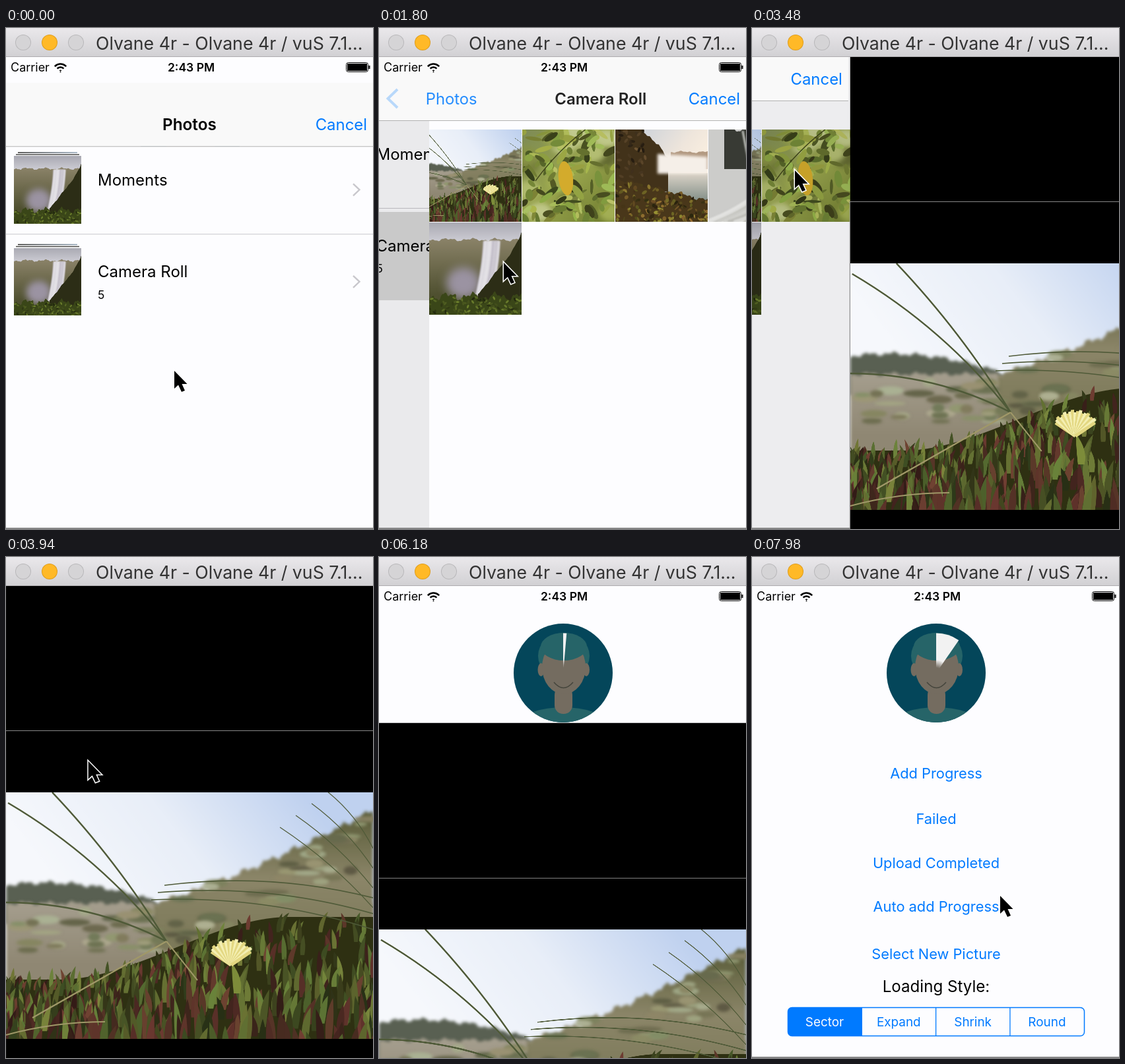
Animation, 556 px wide and 760 px high, one loop 8000 ms. Source, as an HTML page with a canvas:

```html
<!DOCTYPE html>
<html lang="en">
<head>
<meta charset="utf-8">
<title>Photo picker</title>
<style>
html, body { margin: 0; width: 100%; height: 100%; overflow: hidden; background: #fdfdff; }
canvas { display: block; width: 556px; height: 760px; }
</style>
</head>
<body>
<canvas id="stage" width="556" height="760"></canvas>
<script>
const W = 556, H = 760, TOP = 44, SCREEN = 989, LOOP = 8000;
const PAPER = '#fdfdff', BAR = '#f9f9f9', BLUE = '#007aff', INK = '#000';
const RULE = '#c8c7cc', BORDER = '#8a8a8a';
const FONT = 'Inter, Roboto, sans-serif';
const stage = document.getElementById('stage').getContext('2d');
let c = stage;

// ---------- helpers ----------
const clamp = v => Math.max(0, Math.min(1, v));
const mix = (a, b, p) => a + (b - a) * p;
const smooth = p => p * p * (3 - 2 * p);
const rough = x => Math.sin(x * 0.17) + Math.sin(x * 0.41 + 2) * 0.7 + Math.sin(x * 0.93) * 0.4;
const hsl = (h, s, l) => `hsl(${h},${s}%,${l}%)`;

// Share of a critically damped spring still to travel.
function left(t, start) {
  const x = Math.max(0, t - start) * 0.01826;
  return (1 + x) * Math.exp(-x);
}

function random(seed) {
  return () => {
    seed = (seed * 1664525 + 1013904223) >>> 0;
    return seed / 4294967296;
  };
}

function rect(x, y, w, h, fill) {
  c.fillStyle = fill;
  c.fillRect(x, y, w, h);
}

function round(x, y, w, h, r) {
  c.beginPath();
  c.roundRect(x, y, w, h, r);
}

function oval(x, y, rx, ry, fill, turn = 0) {
  c.beginPath();
  c.ellipse(x, y, rx, ry, turn, 0, 7);
  c.fillStyle = fill;
  c.fill();
}

// Fills from the curve top(x) down to a level.
function ridge(fill, x0, x1, bottom, top) {
  c.beginPath();
  c.moveTo(x0, bottom);
  for (let x = x0; x <= x1; x += 2) c.lineTo(x, top(x));
  c.lineTo(x1, bottom);
  c.fillStyle = fill;
  c.fill();
}

function line(color, width, ...p) {
  c.beginPath();
  for (let i = 0; i < p.length; i += 2) c.lineTo(p[i], p[i + 1]);
  c.strokeStyle = color;
  c.lineWidth = width;
  c.stroke();
}

// A curve whose control point lies off the middle by bend.
function stalk(color, width, x0, y0, x1, y1, bend = 0) {
  const dx = x1 - x0, dy = y1 - y0, k = bend / Math.hypot(dx, dy);
  c.beginPath();
  c.moveTo(x0, y0);
  c.quadraticCurveTo((x0 + x1) / 2 + dy * k, (y0 + y1) / 2 - dx * k, x1, y1);
  c.strokeStyle = color;
  c.lineWidth = width;
  c.stroke();
}

function ramp(x0, y0, x1, y1, ...colors) {
  const g = c.createLinearGradient(x0, y0, x1, y1);
  colors.forEach((k, i) => g.addColorStop(i / (colors.length - 1), k));
  return g;
}

// Text placed by the middle of its capitals.
function text(s, x, y, size, color, align = 'left', weight = 400) {
  c.font = `${weight} ${size}px ${FONT}`;
  c.textAlign = align;
  c.fillStyle = color;
  c.fillText(s, x, y + size * 0.36);
}

function faded(alpha, draw) {
  c.save();
  c.globalAlpha = clamp(alpha);
  draw();
  c.restore();
}

function moved(x, y, draw) {
  c.save();
  c.translate(x, y);
  draw();
  c.restore();
}

function soft(px, draw) {
  c.filter = `blur(${px}px)`;
  draw();
  c.filter = 'none';
}

// ---------- pictures ----------
function picture(w, h, draw) {
  const cv = document.createElement('canvas');
  cv.width = w * 2;
  cv.height = h * 2;
  c = cv.getContext('2d');
  c.scale(2, 2);
  draw(random(w + draw.name.length * 97));
  c = stage;
  return cv;
}

function blade(x, y, w, h, lean, fill) {
  c.beginPath();
  c.moveTo(x - w / 2, y);
  c.quadraticCurveTo(x - w * 0.8, y - h * 0.6, x + lean, y - h);
  c.quadraticCurveTo(x + w, y - h * 0.5, x + w / 2, y);
  c.fillStyle = fill;
  c.fill();
}

function dune(rnd) {
  rect(0, 0, W, 374, ramp(120, 190, 420, -40, '#f6f8fc', '#e8eef8', '#bfd1ef'));
  soft(5, () => {
    const hill = x => 168 - 140 * ((x - 224) / 332) ** 1.2 + rough(x) * 3;
    ridge('#596052', 0, 250, 200, x => 137 + 33 * ((x - 60) / 180) ** 2 + rough(x) * 2);
    ridge(ramp(0, 165, 0, 260, '#a59e8e', '#8f8773'), 0, W, 374, x => 168 + rough(x) * 2);
    ridge(ramp(0, 40, 0, 220, '#5d5f3c', '#8b8568', '#7d7a5a'), 224, W, 240, hill);
    for (let i = 0; i < 70; i++) {
      const x = rnd() * W, y = (x < 224 ? 170 : hill(x)) + rnd() * 75;
      oval(x, y, 8 + rnd() * 16, 3 + rnd() * 4, hsl(48 + rnd() * 30, 16, 30 + rnd() * 34));
    }
  });
  const edge = x => 270 - 95 * smooth(clamp((x - 80) / 350));
  ridge('#2e3012', 0, W, 374, x => edge(x) + 14);
  for (let i = 0; i < 520; i++) {
    const d = i / 520, x = rnd() * 570 - 7, red = rnd() < 0.2 + d * 0.25;
    blade(x, mix(edge(x) + 24, 410, d), mix(5, 10, d), mix(26, 64, d) * (0.6 + rnd() * 0.6),
      (rnd() - 0.4) * 20, red ? hsl(8 + rnd() * 12, 38, 14 + rnd() * 18) : hsl(65 + rnd() * 18, 38, 13 + rnd() * 25));
  }
  const green = '#4f5a38', straw = '#a09868';
  const root = [243, 226];
  [[3, 16, 30], [70, 0, 15], [0, 167, 30]].forEach(([x, y, bend]) => stalk(green, 2.4, x, y, ...root, bend));
  for (let i = 0; i < 3; i++) stalk(green, 1.6, 240 - i * 10, 141 + i * 11, W, 160 + i * 24, 30);
  for (let i = 0; i < 4; i++) stalk(green, 1.2, 415 + i * 24, 53 - i * 18, W, 175 - i * 30, 12);
  stalk(straw, 2.4, ...root, 40, 342);
  stalk(straw, 2, ...root, 290, 285);
  stalk(straw, 2, 0, 368, 150, 348, 10);
  blade(350, 305, 10, 46, -8, '#7d8c3a');
  for (let i = 0; i <= 18; i++) {
    const a = mix(-2.55, -0.6, i / 18), r = 36 + (i % 3) * 2;
    stalk(i % 2 ? '#f4efb2' : '#e3d781', 5, 341, 262, 341 + Math.cos(a) * r, 262 + Math.sin(a) * r);
  }
}

function leaves(rnd) {
  rect(0, 0, 140, 140, ramp(0, 0, 140, 140, '#7d8a55', '#9aa64e', '#6d7a2e'));
  soft(8, () => {
    for (let i = 0; i < 14; i++) oval(rnd() * 140, rnd() * 140, 18, 14, hsl(68, 36, 30 + rnd() * 42));
  });
  for (let i = 0; i < 120; i++) {
    oval(rnd() * 140, rnd() * 140, 5 + rnd() * 9, 2 + rnd() * 4,
      hsl(64 + rnd() * 14, 42, 16 + rnd() * 42), rnd() * 3);
  }
  stalk('#3c4018', 1.4, 96, 0, 20, 78, -8);
  oval(66, 74, 11, 26, '#d3ab2c', -0.12);
}

function falls(rnd) {
  rect(0, 0, 140, 140, ramp(50, 0, 140, 70, '#d3d6da', '#efe6dc', '#fff3e2'));
  ridge('#b39a82', 84, 140, 60, x => 34 + rough(x));
  rect(40, 66, 100, 44, ramp(0, 66, 0, 110, '#dcd4c8', '#7f8c86'));
  ridge('#42321a', 0, 80, 94, x => Math.max(0, (x - 42) * 1.1 + rough(x) * 2));
  soft(4, () => ridge('#f5efe8', 64, 140, 67, x => 37 + (x - 64) * 0.06));
  const shore = x => 74 + x * 0.24 + rough(x) * 2;
  ridge('#49371a', 0, 140, 140, shore);
  for (let i = 0; i < 160; i++) {
    const x = rnd() * 140;
    oval(x, mix(shore(x), 140, rnd()), 1 + rnd() * 4, 1 + rnd() * 2, hsl(34 + rnd() * 22, 50, 10 + rnd() * 30), rnd() * 3);
  }
  for (let i = 0; i < 40; i++) oval(rnd() * 46, rnd() * 72, 4, 2, hsl(34, 38, 10 + rnd() * 22), rnd() * 3);
}

function rapids(rnd) {
  rect(0, 0, 140, 140, '#ccccca');
  ridge('#383a34', 24, 104, 60, x => rough(x) * 2);
  ridge('#33301c', 56, 140, 140, x => 36 + (140 - x) ** 1.9 / 45);
  for (let i = 0; i < 50; i++) {
    const x = 76 + rnd() * 64;
    oval(x, mix(60 + (140 - x) * 0.7, 140, rnd()), 2 + rnd() * 6, 3, hsl(44, 34, 9 + rnd() * 24), 1 + rnd());
  }
  soft(2, () => {
    for (let i = 0; i < 26; i++) {
      const d = rnd();
      stalk(hsl(60, 4, 62 + rnd() * 36), 5, 140, mix(20, 38, d), mix(-5, 56, d), 140, mix(34, 50, d));
    }
    for (let i = 0; i < 5; i++) line('#bfc0bb', 3, 52 + i * 14, 2, 60 + i * 11, 44);
  });
}

function gorge(rnd) {
  rect(0, 0, 140, 140, ramp(0, 0, 0, 45, '#a9a9b2', '#e2e1e8'));
  ridge(ramp(0, 25, 0, 110, '#8a8268', '#4f5030'), 0, 140, 140, x => 26 + rough(x) * 1.5);
  soft(14, () => oval(52, 92, 26, 24, '#9b93a2'));
  soft(2, () => {
    for (let i = 0; i < 12; i++) stalk(hsl(265, 10, 72 + rnd() * 20), 4, 84 + i * 2, 28, 72 + i * 2, 110, 4);
  });
  ridge('#2c2d16', 74, 140, 140, x => 16 + 92 * ((140 - x) / 66) ** 0.8 + rough(x));
  const bank = x => 112 + rough(x) * 4;
  ridge('#3a4618', 0, 140, 140, bank);
  for (let i = 0; i < 110; i++) {
    const x = rnd() * 140;
    oval(x, mix(bank(x), 140, rnd()), 3, 1.5, hsl(74, 48, 10 + rnd() * 24), rnd() * 3);
  }
}

const big = picture(W, 374, dune);
const thumbs = [leaves, falls, rapids, gorge].map(f => picture(140, 140, f));

// ---------- screens ----------
function windowBar() {
  rect(0, 0, W, TOP, ramp(0, 0, 0, TOP, '#eae8eb', '#d1d0d3'));
  rect(0, 43, W, 1, '#aeacaf');
  for (let i = 0; i < 3; i++) {
    oval(26 + i * 40, 22, 12, 12, i === 1 ? '#df9d1c' : '#b9b8ba');
    oval(26 + i * 40, 22, 11, 11, i === 1 ? '#ffb927' : '#d5d4d6');
  }
  text('Olvane 4r - Olvane 4r / vuS 7.1...', 136, 23, 26.7, '#333');
}

function statusBar() {
  text('Carrier', 7, 60, 18, INK);
  text('2:43 PM', 280.5, 60, 17.5, INK, 'center', 600);
  [0.5, 6.5, 11.5].forEach(r => {
    c.beginPath();
    c.arc(82.5, 66, r, -Math.PI * 0.77, -Math.PI * 0.23);
    c.strokeStyle = INK;
    c.lineWidth = r < 1 ? 4 : 2.6;
    c.stroke();
  });
  round(515.5, 52.5, 33, 14, 3);
  c.lineWidth = 1;
  c.stroke();
  rect(517, 54, 30, 11, INK);
  rect(549.5, 57, 2, 5, INK);
}

function avatar(angle) {
  const skin = '#746c60', hair = '#266468', start = -Math.PI / 2;
  c.save();
  c.beginPath();
  c.arc(279, 176, 75, 0, 7);
  c.clip();
  rect(204, 101, 150, 150, '#04465a');
  oval(279, 250, 62, 22, hair);
  round(266, 196, 27, 42, 13);
  c.fillStyle = skin;
  c.fill();
  oval(280, 150, 39, 35, hair);
  oval(245.5, 171, 5, 10, skin);
  oval(314, 171, 5, 10, skin);
  oval(280, 167, 33, 41, skin);
  oval(280, 136, 35, 21, hair);
  stalk('#45453c', 1.5, 265, 190, 294, 190, -17);

  const light = c.createRadialGradient(279, 176, 8, 279, 176, 20);
  light.addColorStop(0, skin);
  light.addColorStop(1, '#f2f2f2');
  c.beginPath();
  c.moveTo(279, 176);
  c.arc(279, 176, 60.5, start, start + angle * Math.PI / 180);
  c.fillStyle = light;
  c.fill();
  c.restore();
}

function home(t) {
  rect(0, TOP, W, H - TOP, PAPER);
  avatar(Math.max(0, 5 + (t - 6207) * 0.01664));
  const rows = { 'Add Progress': 328, 'Failed': 397, 'Upload Completed': 464, 'Auto add Progress': 530, 'Select New Picture': 602 };
  for (const name in rows) text(name, 279, rows[name], 21.8, BLUE, 'center');
  text('Loading Style:', 279, 651, 24.1, INK, 'center');
  c.save();
  round(54.5, 683.5, 449, 43, 6);
  c.clip();
  rect(54, 683, 112.5, 45, BLUE);
  c.restore();
  c.strokeStyle = BLUE;
  c.lineWidth = 1.5;
  c.stroke();
  ['Sector', 'Expand', 'Shrink', 'Round'].forEach((name, i) => {
    const x = 54 + i * 112.3;
    if (i) line(BLUE, 1.3, x, 684, x, 726);
    text(name, x + 56, 705, 18.9, i ? BLUE : PAPER, 'center');
  });
}

function albums(picked) {
  rect(0, 140, W + 200, SCREEN, PAPER);
  if (picked) rect(0, 279, W, 134, '#d9d9d9');
  rect(0, 273, W, 1, RULE);
  ['Moments', 'Camera Roll'].forEach((name, i) => moved(0, i * 139.5, () => {
    rect(18, 149, 90, 1.5, ramp(18, 0, 108, 0, '#2c2c28', '#8fa2b4'));
    rect(15, 152, 96, 1.5, '#4b4b48');
    c.drawImage(thumbs[3], 11.5, 155, 102.5, 102.5);
    text(name, 139, 191, 24, INK);
    line(RULE, 2.4, 526, 197, 535.5, 206, 526, 215);
  }));
  text('5', 139, 365, 17.5, INK);
}

function grid() {
  rect(-2, 140, W + 2, H - 140, PAPER);
  c.drawImage(big, 182, 0, 748, 748, -2, 154, 139.5, 140);
  thumbs.forEach((im, i) => {
    const n = i + 1;
    c.drawImage(im, -2 + 141 * (n % 4), 154 + 141 * Math.floor(n / 4), 139.5, 140);
  });
}

// Darkens the page that is being covered.
function tint(p) {
  rect(0, TOP, W, H - TOP, `rgba(0,0,0,${0.085 * p})`);
}

function navBar(r) {
  const p = 1 - r;
  rect(0, TOP, W, 96, BAR);
  rect(0, 140, W, 1, '#b2b2b2');
  faded(1 - p * 1.6, () => text('Photos', mix(237, 39, p), 107, 24.3, INK, 'left', 600));
  faded(p, () => text('Photos', 39 + 226 * r, 107, 23.8, BLUE));
  faded(p, () => text('Camera Roll', 279 + 404 * r, 107, 24, INK, 'center', 600));
  faded((p - 0.81) / 0.19, () => line(BLUE, 4, 28, 93, 13.5, 107, 28, 121));
  text('Cancel', 547, 107, 23.9, BLUE, 'right');
}

function cropper(frameY) {
  rect(0, TOP, W, SCREEN, '#000');
  c.drawImage(big, 0, 357, W, 374);
  c.strokeStyle = '#888';
  c.lineWidth = 1;
  c.strokeRect(-0.5, frameY + 0.5, W + 1, W);
}

// ---------- pointer ----------
// Each glide ends at x, y; below the stage it is out of sight.
const glides = [
  { from: 450, to: 1150, x: 189, y: 356 },
  { from: 1900, to: 2480, x: 65, y: 216 },
  { from: 3800, to: 4450, x: 430, y: 790 },
  { from: 7480, to: 7980, x: 376, y: 514 }
];

function pointer(t) {
  let x = 255, y = 520;
  for (const g of glides) {
    const p = smooth(clamp((t - g.from) / (g.to - g.from)));
    x = mix(x, g.x, p);
    y = mix(y, g.y, p);
  }
  moved(x, y, () => {
    c.beginPath();
    [[0, 0], [0, 27], [6, 21.5], [11, 32], [16, 30], [11.5, 20], [19.5, 20]].forEach(q => c.lineTo(...q));
    c.closePath();
    c.strokeStyle = '#fff';
    c.lineWidth = 3;
    c.stroke();
    c.fillStyle = '#000';
    c.fill();
  });
}

// ---------- timeline ----------
const OPEN = -275, PICK = 1450, PUSH = 1584, VIEW = 3311, CLOSE = 6160;

function scene(t) {
  c.save();
  c.beginPath();
  c.rect(0, TOP, W, H - TOP);
  c.clip();

  if (t >= CLOSE) {
    home(t);
    rect(0, 758, W, 2, BORDER);
    statusBar();
    moved(0, SCREEN * (1 - left(t, CLOSE)), () => cropper(279));
  } else if (t >= VIEW) {
    const r = left(t, VIEW), p = 1 - r;
    rect(0, TOP, W, H - TOP, PAPER);
    moved(-169 * p, 0, grid);
    tint(p);
    moved(-(W + 4) * p, -30, () => navBar(0));
    rect(0, 758, W, 2, BORDER);
    moved(W * r, 0, () => cropper(263));
  } else {
    const r = left(t, PUSH);
    home(0);
    moved(0, SCREEN * left(t, OPEN), () => {
      moved(-167 * (1 - r), 0, () => albums(t >= PICK));
      if (r < 1) {
        tint(1 - r);
        moved(W * r, 0, grid);
      }
      navBar(r);
    });
    statusBar();
    rect(0, 758, W, 2, BORDER);
  }
  pointer(t);
  c.restore();
  windowBar();
}

// Three evenly spaced poses share each 140 ms, shown for 20, 100 and 20 ms.
function pose(ms) {
  const beat = Math.floor(ms / 140), phase = ms - beat * 140;
  return (beat * 3 + (phase < 20 ? 0 : phase < 120 ? 1 : 2)) * 140 / 3;
}

const began = performance.now();
function tick() {
  scene(pose((performance.now() - began) % LOOP));
  requestAnimationFrame(tick);
}
tick();
</script>
</body>
</html>
```
